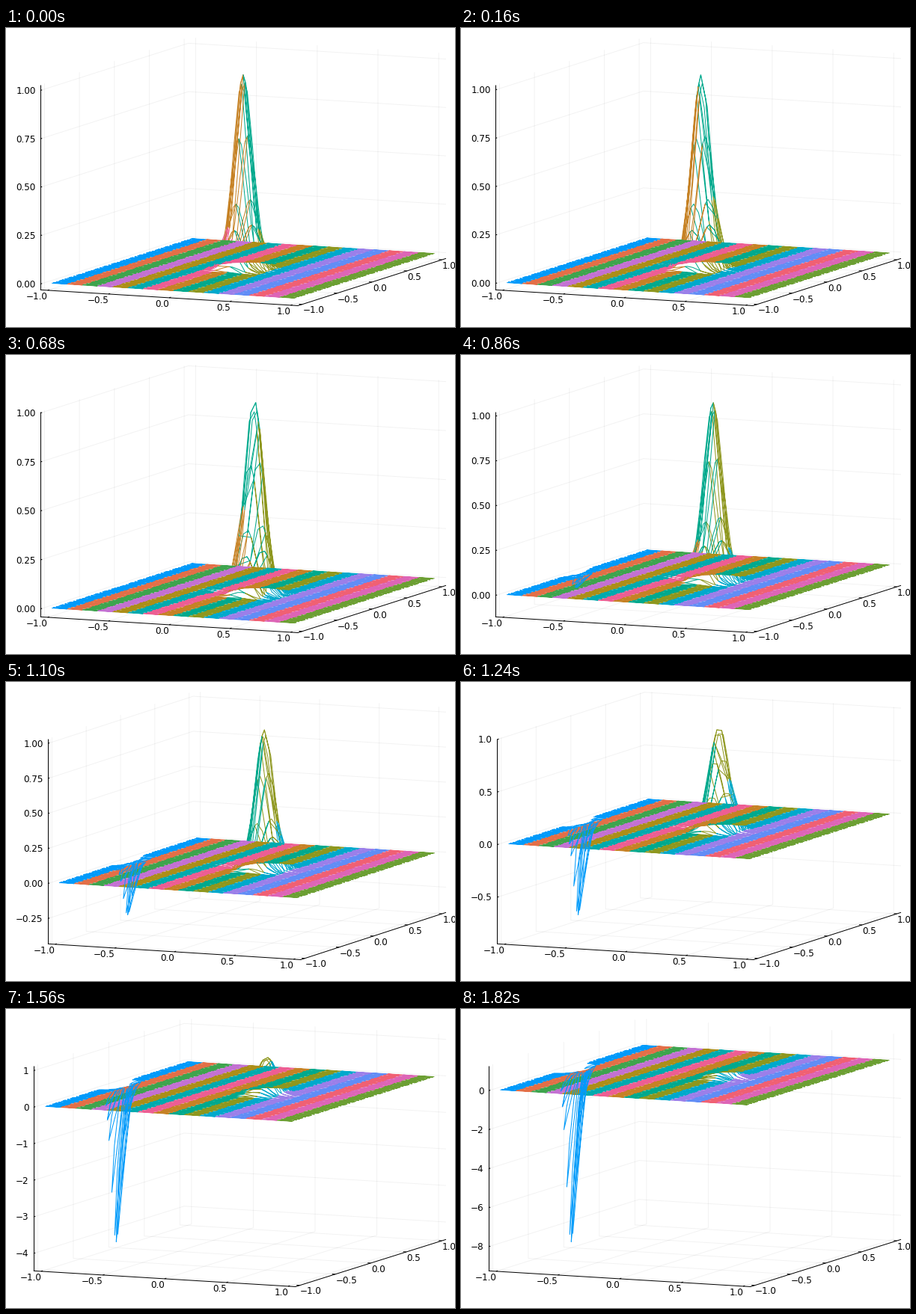
These frames come from a looping animation (600 px wide and 400 px high, 1.84 s). A matplotlib script:

```python
import numpy as np
import matplotlib.pyplot as plt
from matplotlib.animation import FuncAnimation
from matplotlib.collections import LineCollection

W, H, DPI = 600, 400, 100
PX = 72 / DPI
FONT = 12 * PX

PALETTE = ["#009AFA", "#E36F47", "#3EA44E", "#C371D2", "#AC8E18", "#00AAAE",
           "#ED5E93", "#C68225", "#00A98D", "#8E971E", "#00A9CC", "#9B7FE9",
           "#618DF6", "#F06073", "#DD65B6", "#6C9F33"]

# 16 x 16 elements with five Gauss-Lobatto nodes per direction
N = 16
NODES = np.array([-1, -np.sqrt(3 / 7), 0, np.sqrt(3 / 7), 1])
COORDS = -1 + (2 * np.arange(N)[:, None] + 1 + NODES) / N
X = np.tile(COORDS[None, :, None, :], (N, 1, 5, 1)).reshape(N * N, 25)
Y = np.tile(COORDS[:, None, :, None], (1, N, 1, 5)).reshape(N * N, 25)

SPEED = 0.25 / 39
LIM = 1.06
TICKS = np.linspace(-1, 1, 5)

# vertical layout of the box
RIGHT, LEFT_Y, Z_HEIGHT, DROP, RISE = 588, 350.3, 274.5, 21.2, 63.2


def inflow(s):
    return 3.953e-5 * np.maximum(s - 11, 0) ** 3.7


def solution(step):
    cx = SPEED * step
    ridge = np.exp(-100 * Y**2)
    u = (1 - 0.0003 * step) * np.exp(-100 * (X - cx) ** 2) * ridge
    u -= 0.0008 * min(step, 15) * np.exp(-100 * (X - cx + 0.27) ** 2) * ridge
    return u - inflow(step - (X + 1) / SPEED) * ridge


def z_ticks(lo, hi):
    for size, digits in ((0.25, 2), (0.5, 1), (1, 0), (2, 0), (5, 0)):
        ks = np.arange(np.ceil(lo / size), np.floor(hi / size) + 1)
        if len(ks) <= 6:
            break
    return ks * size, [label(k * size, digits) for k in ks]


def label(v, digits=1):
    return f"{v + 0.0:.{digits}f}".replace("-", "\u2212")


def advance(text):
    widths = {"\u2212": 0.838, ".": 0.318}
    return 12 * sum(widths.get(c, 0.636) for c in text)


class Box:
    """Oblique view of the data box; the left edge depends on label width."""

    def __init__(self, left, lo, hi):
        self.left, self.lo, self.hi = left, lo, hi
        self.wx = (RIGHT - left) * 0.635
        self.wy = (RIGHT - left) - self.wx

    def __call__(self, x, y, z):
        fx, fy = (x + LIM) / (2 * LIM), (y + LIM) / (2 * LIM)
        fz = (z - self.lo) / (self.hi - self.lo)
        px = self.left + fx * self.wx + fy * self.wy
        py = LEFT_Y + fx * DROP - fy * RISE - fz * Z_HEIGHT
        return np.stack(np.broadcast_arrays(px, py), -1)

    def path(self, *points):
        return np.array([self(*p) for p in points])


fig = plt.figure(figsize=(W / DPI, H / DPI), dpi=DPI, facecolor="white")
ax = fig.add_axes([0, 0, 1, 1])
ax.set(xlim=(0, W), ylim=(H, 0))
ax.axis("off")

grid = LineCollection([], colors="black", alpha=0.05, linewidths=PX)
frame = LineCollection([], colors="black", linewidths=PX)
mesh = LineCollection([], colors=PALETTE, linewidths=PX, joinstyle="round")
for part in (grid, frame, mesh):
    ax.add_collection(part, autolim=False)


def texts(count, ha):
    return [ax.text(0, 0, "", ha=ha, va="baseline", fontsize=FONT,
                    family="DejaVu Sans", color="black") for _ in range(count)]


x_text, y_text, z_text = texts(5, "right"), texts(5, "left"), texts(6, "right")


def place(text, pos, dx, dy, string):
    text.set_position((pos[0] + dx, pos[1] + dy + 4.4))
    text.set_text(string)


def update(i):
    # three states per 140 ms, held for 20, 100 and 20 ms
    block, r = divmod(i, 7)
    step = 3 * block + (0 if r == 0 else 2 if r == 6 else 1)

    u = solution(step)
    pad = 0.03 * (u.max() - u.min())
    lo, hi = u.min() - pad, u.max() + pad
    zs, names = z_ticks(lo, hi)
    box = Box(19.15 + max(map(advance, names)), lo, hi)

    mesh.set_segments(list(box(X, Y, u)))

    m, notch = LIM, 0.012 * 2 * LIM
    lines = [box.path((t, -m, lo), (t, m, lo), (t, m, hi)) for t in TICKS]
    lines += [box.path((m, t, lo), (-m, t, lo), (-m, t, hi)) for t in TICKS]
    lines += [box.path((-m, -m, z), (-m, m, z), (m, m, z)) for z in zs]
    grid.set_segments(lines)

    lines = [box.path((-m, -m, hi), (-m, -m, lo)),
             box.path((-m, -m, lo), (m, -m, lo), (m, m, lo))]
    lines += [box.path((t, -m, lo), (t, -m + notch, lo)) for t in TICKS]
    lines += [box.path((m, t, lo), (m - notch, t, lo)) for t in TICKS]
    lines += [box.path((-m, -m, z), (-m, -m + notch, z)) for z in zs]
    frame.set_segments(lines)

    for t, tx, ty in zip(TICKS, x_text, y_text):
        place(tx, box(t, -m, lo), 0.5, 8, label(t))
        place(ty, box(m, t, lo), 0.7, 7.3, label(t))
    for k, text in enumerate(z_text):
        if k < len(zs):
            place(text, box(-m, -m, zs[k]), -6.3, 0, names[k])
        else:
            text.set_text("")
    return [grid, frame, mesh, *x_text, *y_text, *z_text]


anim = FuncAnimation(fig, update, frames=92, interval=20, repeat=True,
                     repeat_delay=0, blit=False)
plt.show()
```
